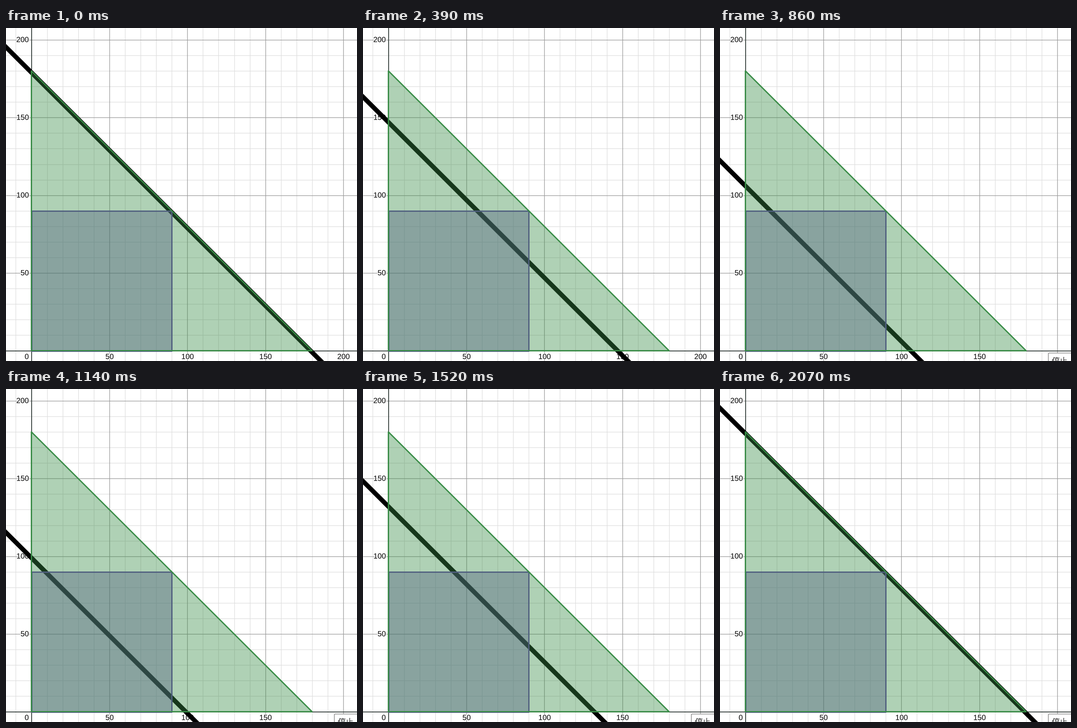
A matplotlib script that plays this animation: 767x730 px, repeating every 2140 ms.

```python
import numpy as np
import matplotlib.pyplot as plt
from matplotlib.animation import FuncAnimation
from matplotlib.collections import LineCollection
from matplotlib.patches import FancyBboxPatch, Polygon
from matplotlib.patheffects import withStroke

W, H, DPI = 767, 730, 100
PX = 72 / DPI                      # points per pixel
X0, Y0, UNIT = 55.5, 707.5, 3.408  # origin and pixels per graph unit
GREEN, PURPLE = "#388c46", "#6042a6"

TICK, LOOP = 10, 2140              # ms
LONG_STEPS = {10, 14, 20, 24, 28, 32, 39, 45, 55}
STEPS = 67
TOOLTIP_AT = 840

starts = np.cumsum([0] + [40 if i in LONG_STEPS else 30
                          for i in range(STEPS - 1)])


def px(x, y):
    return X0 + UNIT * x, Y0 - UNIT * y


def intercept(t):
    """Slider value bouncing between 179 and 90 in whole steps."""
    return round(90.3 + 0.0855 * abs(t - 1034))


fig = plt.figure(figsize=(W / DPI, H / DPI), dpi=DPI, facecolor="white")
ax = fig.add_axes([0, 0, 1, 1])
ax.set_xlim(0, W)
ax.set_ylim(H, 0)
ax.axis("off")


def rules(xs, ys, color, width, z):
    segs = [[(x, 0), (x, H)] for x in xs] + [[(0, y), (W, y)] for y in ys]
    ax.add_collection(LineCollection(segs, colors=color, linewidths=width * PX,
                                     zorder=z))


def label(text, x, y, ha):
    ax.text(x, y, text, ha=ha, va="baseline", fontsize=16.4 * PX,
            family="Liberation Sans", color="black", zorder=4,
            path_effects=[withStroke(linewidth=3 * PX, foreground="white")])


def shape(points, color, z):
    pts = [px(*p) for p in points]
    ax.add_patch(Polygon(pts, facecolor=color, alpha=0.4, lw=0, zorder=z))
    ax.add_patch(Polygon(pts, fill=False, edgecolor=color, lw=2.8 * PX,
                         joinstyle="round", zorder=z + 0.1))


minor = [v for v in range(-10, 211, 10) if v % 50]
major = range(50, 201, 50)
rules([px(v, 0)[0] for v in minor], [px(0, v)[1] for v in minor],
      "#dedede", 1.2, 1)
rules([px(v, 0)[0] for v in major], [px(0, v)[1] for v in major],
      "#9c9c9c", 1.3, 2)
rules([X0], [Y0], "#2f3a36", 1.8, 3)

label("0", 45.3, 725.7, "center")
for v in major:
    x, y = px(v, v)
    label(str(v), x + 0.5, 725.7, "center")
    label(str(v), 50, y + 5, "right")

line, = ax.plot([], [], color="black", lw=10 * PX, zorder=5)
shape([(0, 0), (90, 0), (90, 90), (0, 90)], PURPLE, 6)
shape([(0, 0), (180, 0), (0, 180)], GREEN, 7)

tooltip = [
    ax.add_patch(FancyBboxPatch((717.5, 712.5), 70, 50,
                                boxstyle="round,pad=0,rounding_size=1.5",
                                facecolor="white", edgecolor="#858585",
                                lw=1.4 * PX, zorder=9)),
    ax.text(725, 735.8, "停止", family="Noto Sans CJK JP", fontsize=17.6 * PX,
            va="baseline", color="#303030", zorder=10),
]


def update(i):
    step = np.searchsorted(starts, i * TICK, side="right") - 1
    t = int(starts[step])
    k = intercept(t)
    xs = np.array([-30, 230])
    line.set_data(*px(xs, k - xs))
    for part in tooltip:
        part.set_visible(t >= TOOLTIP_AT)
    return [line, *tooltip]


anim = FuncAnimation(fig, update, frames=LOOP // TICK, interval=TICK,
                     repeat=True, repeat_delay=0, blit=False)
plt.show()
```
